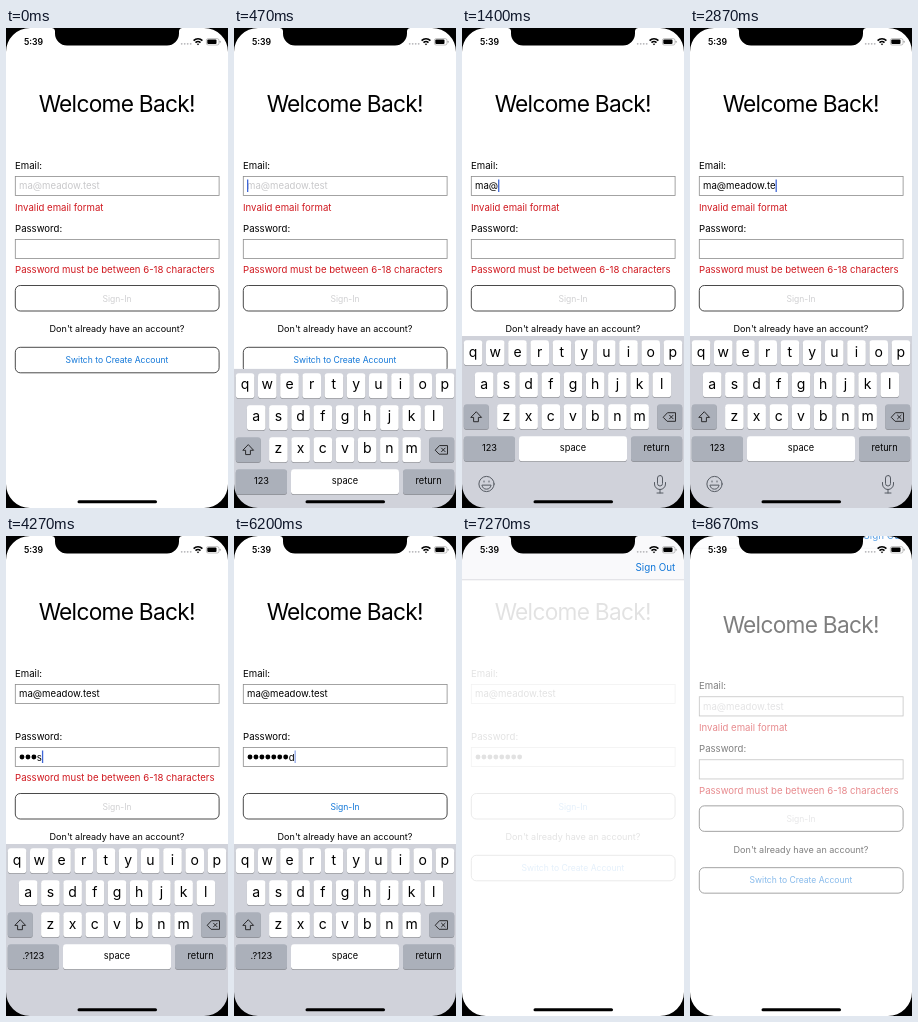
Animation of 222x480 px, one loop 8.74 s. Source, as an HTML page:

```html
<!DOCTYPE html>
<html lang="en">
<head>
<meta charset="utf-8">
<title>Sign-in form</title>
<style>
  html, body { margin: 0; width: 100%; height: 100%; overflow: hidden; background: #fff; }
  svg { display: block; width: 222px; height: 480px; }
  text { font: 9.6px Inter, Roboto, sans-serif; white-space: pre; }
  .mid { text-anchor: middle; }
  .title { font-size: 22.7px; letter-spacing: -.72px; }
  .note { font-size: 9.06px; }
  .button { font-size: 8.55px; }
  .error { fill: #d0181f; }
  .field, .box { fill: none; stroke: #8c8c8c; stroke-width: .8; }
  .box { stroke: #1c1c1c; }
  .blue { fill: #1277d8; }
  .hint { fill: #c8c8ca; }
  .off { fill: #d0d0d2; }
  .caret { fill: #3f66d6; }
  .letter { font-size: 14px; text-anchor: middle; }
  .word { font-size: 9.2px; text-anchor: middle; }
  .icon { fill: none; stroke: #555a62; stroke-width: 1; stroke-linejoin: round; stroke-linecap: round; }
  .dark { stroke: #2a2a2c; }
  .clock { font-size: 8.7px; font-weight: 600; }
  .action { font-size: 9.8px; }
</style>
</head>
<body>
<svg viewBox="0 0 222 480">
  <g id="form">
    <text class="title mid" x="110.7" y="84.4">Welcome Back!</text>
    <text x="9" y="140.7">Email:</text>
    <rect class="field" x="9.3" y="148.4" width="203.8" height="19.2"/>
    <text id="hint" class="hint" x="13" y="161.3"></text>
    <text id="email" x="13" y="161.3"></text>
    <text id="emailError" class="error" x="9" y="182.6">Invalid email format</text>
    <text x="9" y="203.8">Password:</text>
    <rect class="field" x="9.3" y="211.4" width="203.8" height="19.2"/>
    <g id="dots"></g>
    <text id="lastChar" y="224.5"></text>
    <text id="passError" class="error" x="9" y="245.4">Password must be between 6-18 characters</text>
    <rect class="box" x="9.3" y="257.5" width="203.8" height="25.5" rx="5"/>
    <text id="signIn" class="button mid" x="111" y="273.6">Sign-In</text>
    <text class="note mid" x="111" y="304.3">Don't already have an account?</text>
    <rect class="box" x="9.3" y="319.3" width="203.8" height="25.5" rx="5"/>
    <text class="button blue mid" x="111" y="335.1">Switch to Create Account</text>
    <rect id="caret" class="caret" width="1.3" height="12.5"/>
  </g>

  <g id="keyboard">
    <rect y="308" width="222" height="180" fill="#d0d2da"/>
    <g id="keys"></g>
    <path class="icon dark" d="M14 384l-5.2 5.4h2.8v4.3h4.8v-4.3h2.8z"/>
    <path class="icon dark" d="M201.5 389l4-4.3h8v8.6h-8zM207.5 387.2l3.6 3.6m0-3.6l-3.6 3.6"/>
    <g id="extras" class="icon">
      <circle cx="24.5" cy="456" r="7.6"/>
      <path d="M20 457.5a4.6 4.6 0 0 0 9 0zM22 453v1M27 453v1"/>
      <rect x="195.5" y="447.5" width="5" height="10.5" rx="2.5"/>
      <path d="M192.5 454.5v1.5a5.5 5.5 0 0 0 11 0v-1.5M198 461.5v3.5m-3 0h6"/>
    </g>
  </g>

  <g id="bar">
    <rect y="-44" width="222" height="88" fill="#f9f9fb"/>
    <rect y="43.5" width="222" height=".7" fill="#cfcfd6"/>
  </g>
  <text id="signOut" class="blue action" x="173.5" y="34.5">Sign Out</text>

  <text class="clock" x="18" y="17">5:39</text>
  <g fill="#b5b5b8">
    <circle cx="175.7" cy="15.8" r=".9"/><circle cx="178.7" cy="15.8" r=".9"/>
    <circle cx="181.7" cy="15.8" r=".9"/><circle cx="184.7" cy="15.8" r=".9"/>
  </g>
  <g fill="none" stroke="#000" stroke-width="1.6">
    <path d="M187.6 12.6a6.2 6.2 0 0 1 8.8 0M189.5 14.7a3.6 3.6 0 0 1 5 0"/>
    <path d="M192 17.3l-1.2-1.2a1.7 1.7 0 0 1 2.4 0z" fill="#000" stroke="none"/>
  </g>
  <rect x="200.4" y="10.6" width="12.6" height="6.4" rx="1.8" fill="none" stroke="#999" stroke-width=".6"/>
  <rect x="201.3" y="11.5" width="9.2" height="4.6" rx="1"/>
  <rect x="213.7" y="12.8" width=".8" height="2.2" rx=".4" fill="#999"/>
  <path fill-rule="evenodd" d="M0 0H222V480H0Z
    M0 24A24 24 0 0 1 24 0H45.5a3.5 3.5 0 0 1 3.5 3.5V5.5a12 12 0 0 0 12 12H161a12 12 0 0 0 12-12V3.5
    a3.5 3.5 0 0 1 3.5-3.5H198A24 24 0 0 1 222 24V456A24 24 0 0 1 198 480H24A24 24 0 0 1 0 456Z"/>
  <rect x="71.5" y="472.3" width="79.5" height="3" rx="1.5"/>
</svg>

<script>
const LOOP = 8740;
const EMAIL = 'ma@meadow.test', PASSWORD = 'password';
const emailTimes = [930, 1130, 1400, 1600, 1800, 2000, 2130, 2330, 2470, 2600, 2730, 2870, 2930, 3130];
const passTimes = [3670, 3930, 4130, 4270, 4470, 4670, 4800, 4930];
const FOCUS_EMAIL = 200, FOCUS_PASSWORD = 3400, DISMISS = 6270, RESET = 7700, SIGN_OUT = 8450;
const DOT_PITCH = 5.95;

const $ = id => document.getElementById(id);
const clamp = v => Math.max(0, Math.min(1, v));
const progress = (t, start, length) => clamp((t - start) / length);
const smooth = p => p * p * (3 - 2 * p);
const typed = (times, t) => times.filter(at => t >= at).length;
const show = (el, on) => el.setAttribute('visibility', on ? 'visible' : 'hidden');
const moveY = (el, y) => el.setAttribute('transform', `translate(0 ${y})`);

// Critically damped remainder, from 1 to 0.
function settle(t, start) {
  const x = Math.max(0, t - start) * .0113;
  return (1 + x) * Math.exp(-x);
}

function key(x, y, width, label = '', dark = false) {
  const rect = (fill, dy) =>
    `<rect x="${x}" y="${y + dy}" width="${width}" height="25" rx="3" fill="${fill}"/>`;
  const isLetter = label.length === 1;
  return rect('#8b8d93', .7) + rect(dark ? '#abb0ba' : '#fff', 0) +
    `<text class="${isLetter ? 'letter' : 'word'}" x="${x + width / 2}" y="${y + (isLetter ? 16.2 : 14.8)}">${label}</text>`;
}

function buildKeyboard() {
  const rows = [['qwertyuiop', 1.8, 312.3], ['asdfghjkl', 12.9, 344.3], ['zxcvbnm', 35.1, 376.3]];
  let html = rows.map(([letters, x, y]) =>
    [...letters].map((c, i) => key(x + 22.2 * i, y, 18.6, c)).join('')).join('');
  html += key(1.8, 376.3, 25, '', true) + key(195.2, 376.3, 25, '', true);
  html += key(1.8, 408.3, 51.2, '123', true) + key(57, 408.3, 108, 'space') + key(169, 408.3, 51.2, 'return', true);
  $('keys').innerHTML = html;
  return [...$('keys').querySelectorAll('.word')].find(el => el.textContent === '123');
}

const modeLabel = buildKeyboard();
$('hint').textContent = EMAIL;
$('dots').innerHTML = [...PASSWORD].map((_, i) =>
  `<circle cx="${16 + DOT_PITCH * i}" cy="221" r="2.45"/>`).join('');
const dots = [...$('dots').children];

function drawFields(t) {
  const fresh = t >= RESET;
  const emailCount = fresh ? 0 : typed(emailTimes, t);
  const passCount = fresh ? 0 : typed(passTimes, t);
  const inPassword = t >= FOCUS_PASSWORD;
  const revealed = passCount > 0 && t < DISMISS;
  const hidden = passCount - revealed;
  const valid = passCount >= 6;

  $('email').textContent = EMAIL.slice(0, emailCount);
  show($('hint'), emailCount === 0);
  show($('emailError'), emailCount < 13);
  show($('passError'), !valid);
  $('signIn').setAttribute('class', `button mid ${valid ? 'blue' : 'off'}`);

  dots.forEach((dot, i) => show(dot, i < hidden));
  const lastX = 13 + DOT_PITCH * hidden;
  $('lastChar').textContent = revealed ? PASSWORD[passCount - 1] : '';
  $('lastChar').setAttribute('x', lastX);

  const active = $(inPassword ? 'lastChar' : 'email');
  const startX = inPassword ? lastX : 13;
  const width = active.textContent ? active.getComputedTextLength() : 0;
  const blink = 1 - progress(t, 5480, 320) + progress(t, 6020, 320);
  $('caret').setAttribute('x', startX + width);
  $('caret').setAttribute('y', inPassword ? 214.5 : 151.5);
  $('caret').setAttribute('opacity', t >= FOCUS_EMAIL && t < DISMISS ? blink : 0);
}

function drawKeyboard(t) {
  const lowered = t < DISMISS ? settle(t, FOCUS_EMAIL) : 1 - settle(t, DISMISS);
  const inPassword = t >= FOCUS_PASSWORD;
  moveY($('keyboard'), 173 * lowered);
  show($('keyboard'), t > FOCUS_EMAIL && t < 6980);
  show($('extras'), !inPassword);
  modeLabel.textContent = inPassword ? '.?123' : '123';
}

function drawScreens(t) {
  const leaving = progress(t, SIGN_OUT, 440);
  const fadeOut = 1 - smooth(progress(t, 6970, 380));
  const offset = t < SIGN_OUT ? 0 : 44 * (1 - leaving) ** 1.82;
  const barY = t < SIGN_OUT ? -44 * (1 - progress(t, 6980, 270)) ** 2 : offset - 44;

  $('form').setAttribute('opacity', t < RESET ? fadeOut : smooth(leaving));
  moveY($('form'), offset);
  for (const el of [$('bar'), $('signOut')]) {
    moveY(el, barY);
    show(el, t >= 6980);
  }
  $('bar').setAttribute('opacity', clamp(1 - leaving * 1.5));
  $('signOut').setAttribute('opacity', 1 - leaving * .6);
}

function frame() {
  const t = performance.now() % LOOP;
  drawFields(t);
  drawKeyboard(t);
  drawScreens(t);
  requestAnimationFrame(frame);
}
frame();
</script>
</body>
</html>
```
